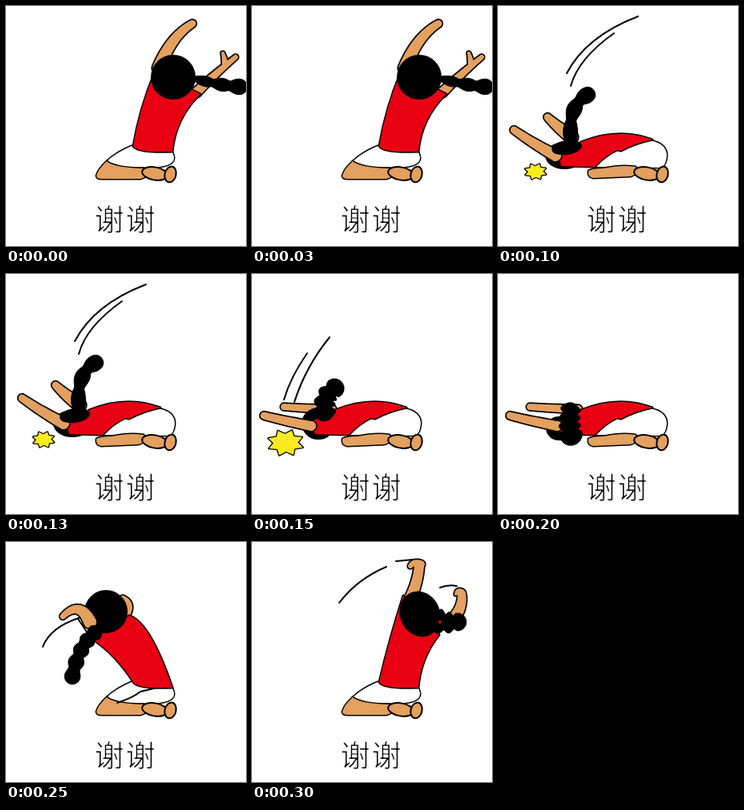
These frames come from a looping animation (300 by 300 pixels, 0.35 s). An HTML page:

```html
<!DOCTYPE html>
<html lang="zh">
<head>
<meta charset="utf-8">
<style>
html, body { margin: 0; width: 100%; height: 100%; overflow: hidden; background: #fff; }
svg { display: block; width: 300px; height: 300px; }
text { font: 300 37px "Noto Sans CJK SC", "Noto Sans CJK", sans-serif; letter-spacing: 2px; stroke: #fff; stroke-width: .9px; }
</style>
</head>
<body>
<svg viewBox="0 0 300 300" stroke-linecap="round" stroke-linejoin="round">
  <g id="figure"></g>
  <text x="110.500" y="281">谢谢</text>
</svg>
<script>
const STEP = 50;
const RED = '#e90012', SKIN = '#e3a05f', WHITE = '#fff', BLACK = '#000', YELLOW = '#fbea20';

const fill = (color, d, outline = 3.4) =>
  `<path d="${d}" fill="${color}" stroke="#000" stroke-width="${outline}" paint-order="stroke"/>`;
const line = d => `<path d="${d}" fill="none" stroke="#000" stroke-width="2"/>`;
const oval = (color, x, y, rx, ry, turn = 0) =>
  `<ellipse cx="${x}" cy="${y}" rx="${rx}" ry="${ry}" transform="rotate(${turn} ${x} ${y})" fill="${color}" stroke="#000" stroke-width="2"/>`;

// Outline of a bent band whose half-width runs from one end to the other and swells in lumps.
function band([x1, y1, w1], [bx, by], [x2, y2, w2], lumps = 0) {
  const steps = 24, upper = [], lower = [];
  for (let i = 0; i <= steps; i++) {
    const t = i / steps, u = 1 - t;
    const x = u * u * x1 + 2 * u * t * bx + t * t * x2;
    const y = u * u * y1 + 2 * u * t * by + t * t * y2;
    const dx = u * (bx - x1) + t * (x2 - bx), dy = u * (by - y1) + t * (y2 - by);
    const swell = lumps ? .7 + .4 * Math.abs(Math.sin(lumps * Math.PI * t)) : 1;
    const k = (u * w1 + t * w2) * swell / Math.hypot(dx, dy);
    upper.push(`${x + dy * k},${y - dx * k}`);
    lower.unshift(`${x - dy * k},${y + dx * k}`);
  }
  return `M${upper.join('L')}A${w2} ${w2} 0 0 1 ${lower.join('L')}A${w1} ${w1} 0 0 1 ${upper[0]}Z`;
}

const arm = (from, bend, to, hand = '') => fill(SKIN, band(from, bend, to) + hand);
const braid = (from, bend, to, lumps) => fill(BLACK, band(from, bend, to, lumps), 1);

function spark(x, y, size, spikes = 8) {
  let d = '';
  for (let i = 0; i < spikes * 2; i++) {
    const a = i * Math.PI / spikes + .35, r = size * (i % 2 ? .66 : 1);
    d += `${i ? 'L' : 'M'}${x + r * Math.cos(a)},${y + r * .72 * Math.sin(a)}`;
  }
  return fill(YELLOW, d + 'Z', 2.6);
}

const feet = oval(SKIN, 186, 209.5, 16, 8, 10) + oval(SKIN, 205.5, 210.5, 7, 10, 14);

const kneeling =
  fill(WHITE, 'M126,194Q138,183 157,175L208,183Q216,198 192,201L150,202Z', 3) +
  fill(SKIN, 'M113,212Q115,204 126,194Q134,202 172,203Q182,212 168,216L120,216Q113,216 113,212Z', 3) + feet;
const fold = line('M139,201Q158,195 168,187L185,183');
const torso = (left, leftBend, right, rightBend) =>
  fill(RED, `M${left}Q${leftBend} 159,175Q164,184 208,182Q${rightBend} ${right}Z`, 3);

const lying =
  fill(WHITE, 'M120,201Q142,176 190,168Q211,172 211,187Q210,199 204,202Z', 3) +
  fill(SKIN, 'M113,206Q118,203 132,203Q155,198 172,201Q177,210 165,213L119,215Q112,214 113,206Z', 3) + feet;
const lyingShirt = fill(RED, 'M75,184L79,200L121,201Q134,187 149,180L154,181Q170,172 193,167Q150,151 104,170Z', 3);
const backArm = arm([40, 166, 4], [65, 168], [100, 169, 5]);
const frontArm = arm([15, 177, 4.5], [42, 184], [74, 190, 6]);

const raised = kneeling +
  arm([191, 78, 8], [206, 38], [233, 22, 4.5]) +
  arm([238, 108, 6], [260, 86], [287, 64, 3], band([274, 73, 4], [273, 65], [271, 59, 2])) +
  torso([186, 82], [167, 128], [243, 110], [212, 140]) +
  oval(BLACK, 209, 89, 27, 27) +
  braid([237, 91, 5], [265, 99], [292, 101, 9], 2.6);

const bending = kneeling + fold +
  arm([152, 92, 6], [147, 52], [180, 35, 1]) +
  line('M176,36Q200,25 222,32') +
  torso([102, 107], [124, 128], [158, 90], [186, 122]) +
  fill(RED, 'M160,106L179,102L172,108L180,112L168,115Z', 2) +
  oval(BLACK, 127, 88, 24, 23) +
  braid([144, 64, 8], [172, 50], [198, 55, 10], 3) +
  arm([111, 106, 9], [111, 56], [160, 29, 1]);

const falling = lying +
  arm([62, 139, 4.5], [73, 150], [92, 164, 8]) +
  oval(BLACK, 83, 187, 23, 16) + lyingShirt +
  arm([20, 155, 4.5], [44, 172], [72, 187, 7]) +
  oval(BLACK, 86, 177, 18, 8, -8) +
  braid([92, 176, 8], [85, 125], [112, 111, 9], 2.6) +
  line('M91,100Q100,66 145,34') + line('M86,84Q110,38 175,13') +
  spark(47, 207, 14);

const landing = lying + backArm +
  oval(BLACK, 83, 187, 20, 19) + lyingShirt + frontArm +
  braid([92, 180, 13], [86, 154], [103, 143, 11], 3.5) +
  line('M97,79Q67,116 53,160') + line('M69,99Q48,129 40,157') +
  spark(42, 211, 23);

const resting = lying + backArm +
  oval(BLACK, 76, 193, 15, 14) + lyingShirt + frontArm +
  braid([92, 164, 11], [88, 182], [91, 200, 13], 3.5);

const rising = kneeling + fold +
  arm([146, 71, 4], [159, 78], [149, 92, 5]) +
  torso([109, 122], [138, 142], [154, 92], [180, 100]) +
  oval(BLACK, 125, 87, 26, 26) +
  arm([71, 93, 3.5], [92, 72], [105, 100, 8]) +
  line('M46,131Q55,107 91,95') + line('M90,96L104,117') +
  braid([116, 110, 9], [92, 125], [83, 168, 9], 4.5);

const lifting = kneeling +
  arm([197, 72, 7], [207, 52], [209, 30, 6], band([211, 28, 5], [202, 24], [198, 30, 3])) +
  arm([255, 92, 7], [264, 78], [262, 64, 5], band([262, 63, 4], [257, 59], [255, 65, 2])) +
  torso([189, 67], [172, 120], [234, 116], [211, 145]) +
  oval(BLACK, 210, 90, 24, 28, -22) +
  braid([228, 98, 15], [245, 102], [257, 100, 10], 2.5) +
  oval(RED, 235, 100, 3, 3) +
  line('M109,76Q132,46 168,31') + line('M180,24L201,22') + line('M235,57Q245,53 256,55');

const poses = [raised, bending, falling, landing, resting, rising, lifting];
const figure = document.getElementById('figure');
figure.innerHTML = poses.map(pose => `<g>${pose}</g>`).join('');
const groups = [...figure.children];

function render(ms) {
  const active = Math.floor(ms / STEP) % groups.length;
  groups.forEach((group, i) => group.setAttribute('display', i === active ? 'inline' : 'none'));
}

const start = performance.now();
function tick() {
  render(performance.now() - start);
  requestAnimationFrame(tick);
}
tick();
</script>
</body>
</html>
```
